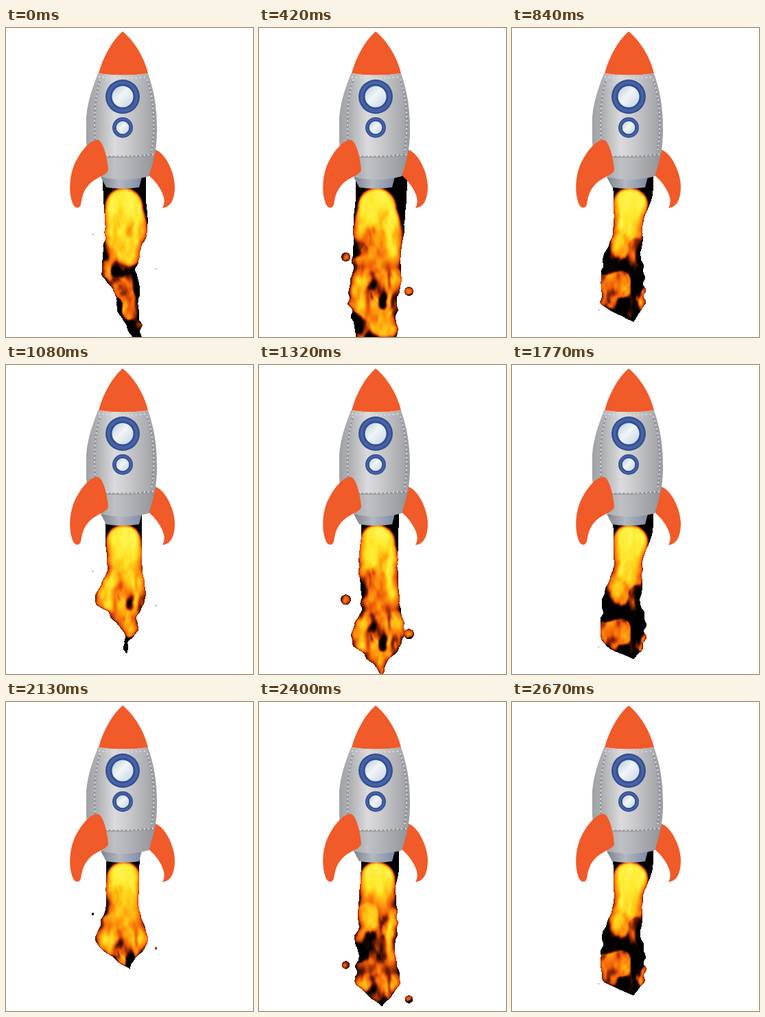
An HTML page with a canvas for the animation above (2.7 s loop, 360 px wide and 450 px high).

```html
<!DOCTYPE html>
<html lang="en">
<head>
<meta charset="utf-8">
<title>Rocket</title>
<style>
html, body { margin: 0; width: 100%; height: 100%; overflow: hidden; background: #fff; }
canvas, svg { position: absolute; left: 0; top: 0; }
canvas { left: 90px; top: 214px; }
.rivets { fill: none; stroke: #dcdde0; stroke-width: 2.4; stroke-linecap: round; stroke-dasharray: 0 6; }
.seam { fill: none; stroke: #85878c; stroke-width: 3; opacity: .55; }
</style>
</head>
<body>
<canvas width="160" height="236"></canvas>
<svg width="360" height="450" viewBox="0 0 360 450">
  <defs>
    <linearGradient id="metal">
      <stop offset="0" stop-color="#a0a1a5"/><stop offset=".16" stop-color="#b0b1b4"/>
      <stop offset=".4" stop-color="#dbdbdd"/><stop offset=".55" stop-color="#cfcfd2"/>
      <stop offset=".85" stop-color="#adaeb1"/><stop offset="1" stop-color="#9b9ca0"/>
    </linearGradient>
    <linearGradient id="nozzle">
      <stop offset="0" stop-color="#7d828c"/><stop offset=".45" stop-color="#b4b8c0"/><stop offset="1" stop-color="#7f8aa5"/>
    </linearGradient>
    <linearGradient id="glass" x2="1" y2="1">
      <stop offset=".2" stop-color="#cfdbe6"/><stop offset=".45" stop-color="#f0f5f8"/><stop offset=".8" stop-color="#d3dee9"/>
    </linearGradient>
    <g id="porthole">
      <circle r="25" fill="#34508f"/><circle r="20.5" fill="none" stroke="#4862a6" stroke-width="4"/>
      <circle r="16.5" fill="url(#glass)" stroke="#304f9b" stroke-width="2"/>
    </g>
  </defs>
  <g fill="#f15a29">
    <path d="M217 177C231 181 245 207 246 230C246 250 240 261 228 262C232 255 231 248 228 241C223 229 214 219 207 214L200 195Z"/>
    <path fill="url(#nozzle)" d="M138 217H198L194 232Q170 236 146 232Z"/>
    <path fill="url(#metal)" d="M134 66Q170 71 207 66C216 92 220 115 220 148Q220 172 216 188Q212 205 208 216Q173 225 139 217Q117 185 117 165V130C119 105 127 85 134 66Z"/>
    <path fill="#6d717a" opacity=".25" d="M122 184Q170 190 217 183Q213 204 208 216Q173 225 139 217Z"/>
    <g id="joints">
      <path class="seam" d="M137 76C129 100 128 135 130 168M206 76C216 105 218 145 212 180M122 186Q170 190 216 184"/>
      <path class="rivets" d="M136 71Q170 75 206 71M137 76C129 100 128 135 130 168M206 76C216 105 218 145 212 180M148 186Q180 188 215 184"/>
    </g>
    <path d="M170 5C187 19 201 42 207 66Q170 71 135 66C141 44 153 20 170 5Z"/>
    <path d="M133 163C122 163 106 182 98 203C92 220 92 240 96 252C99 264 107 264 109 257C111 246 112 238 121 228C131 217 149 214 149 206C148 192 142 163 133 163Z"/>
  </g>
  <use href="#porthole" transform="translate(170 100)"/>
  <use href="#porthole" transform="translate(170 145) scale(.6)"/>
</svg>
<script>
const STEP = 30, LOOP = 2700, X0 = 90, Y0 = 214, TOP = 236, GAP = 54;
const canvas = document.querySelector('canvas'), ctx = canvas.getContext('2d');
const W = canvas.width, H = canvas.height, image = ctx.createImageData(W, H);

// Flame shapes: [centre, half width] at five heights, GAP apart
const ignite = [[172, 31], [175, 31], [164, 26], [177, 18], [190, 6]];
const spread = [[170, 24], [169, 24], [167, 37], [178, -2], [178, -20]];
const billow = [[178, 37], [174, 37], [170, 36], [166, 35], [168, 30]];
const shed = [[176, 27], [173, 28], [176, 29], [172, 37], [175, 2]];
const smoulder = [[176, 29], [169, 21], [160, 28], [161, 31], [188, -20]];
const keys = [[0, ignite], [330, spread], [420, billow], [450, shed], [840, smoulder], [930, smoulder]];
const bursts = [1800, 870, 0];
const palette = ['000000', '0c0400', '731e00', 'ec5808', 'ff910c', 'ffc514', 'ffe82d', 'fff450']
  .map(hex => [0, 2, 4].map(i => parseInt(hex.slice(i, i + 2), 16)));

const mix = (a, b, k) => a + (b - a) * k;
const clamp = v => Math.min(1, Math.max(0, v));
const ease = k => k * k * (3 - 2 * k);

function hash(x, y) {
  const v = Math.sin(x * 127.1 + y * 311.7) * 43758.5453;
  return v - Math.floor(v);
}

// Smooth noise from -0.5 to 0.5
function noise(x, y) {
  const i = Math.floor(x), j = Math.floor(y), u = ease(x - i), v = ease(y - j);
  return mix(mix(hash(i, j), hash(i + 1, j), u), mix(hash(i, j + 1), hash(i + 1, j + 1), u), v) - .5;
}

function outline(shape, y) {
  const r = clamp((y - TOP) / GAP / 4) * 4, i = Math.min(3, Math.floor(r)), k = ease(r - i);
  return [0, 1].map(c => mix(shape[i][c], shape[i + 1][c], k));
}

// Sparks fall beside the flame, growing and burning out
function sparksAt(phase) {
  return [1, 2].map(id => {
    const age = clamp((phase - 300) / 400);
    return { x: 172 + (id * 2 - 3) * 46, y: 250 + id * 50 + 110 * age, r: 8 * Math.sin(Math.PI * age) };
  });
}

function heatAt(x, y, depth, fall, flow) {
  const bend = noise(x / 14, (y - flow) / 20) * 14;
  const lick = noise((x + bend) / 9 + 20, (y - flow) / 24) * .7 + noise((x - bend) / 5, (y - flow) / 11) * .3;
  const patch = noise(x / 20 + 40, (y - flow) / 27);
  const core = Math.hypot((x - 171) / (25 + .3 * Math.max(0, y - 262)), Math.min(0, y - 262) / 26);
  const base = (.96 - .42 * fall + lick * mix(.25, .75, fall)) * Math.pow(clamp((depth + 1.5) / 12), .45);
  return base * ease(clamp((1.3 - core) / .4)) - fall * ease(clamp(patch * 4)) * .6;
}

function drawFlame(phase) {
  let n = 0;
  while (phase >= keys[n + 1][0]) n++;
  const [t0, a] = keys[n], [t1, b] = keys[n + 1];
  const k = (phase - t0) / (t1 - t0), flow = phase * .25;
  const sway = 4 + (a === b ? 0 : Math.sin(Math.PI * k) * 12);
  const sparks = sparksAt(phase);
  image.data.fill(0);

  for (let row = 0; row < H; row++) {
    const y = row + Y0, fall = clamp((y - 250) / 120);
    const wave = seed => noise(seed, (y - flow) / 22) * sway * fall + noise(seed + 7, (y - flow) / 9) * 6 * fall;
    const [mid, half] = outline(a, y).map((v, c) => mix(v, outline(b, y)[c], k));
    const left = mid - half + wave(3), right = mid + half + wave(5);
    for (let col = 0; col < W; col++) {
      const x = col + X0;
      let depth = Math.min(x - left, right - x);
      for (const s of sparks) depth = Math.max(depth, s.r - Math.hypot(x - s.x, y - s.y));
      if (depth < 0) continue;

      const level = clamp(heatAt(x, y, depth, fall, flow)) * 6.99;
      const i = Math.floor(level), p = (row * W + col) * 4;
      for (let c = 0; c < 3; c++) image.data[p + c] = mix(palette[i][c], palette[i + 1][c], level - i);
      image.data[p + 3] = 255;
    }
  }
  ctx.putImageData(image, 0, 0);
}

let shown = -1;
function tick() {
  const t = Math.floor(performance.now() % LOOP / STEP) * STEP;
  if (t !== shown) drawFlame(t - bursts.find(start => t >= start));
  shown = t;
  requestAnimationFrame(tick);
}
tick();
</script>
</body>
</html>
```
